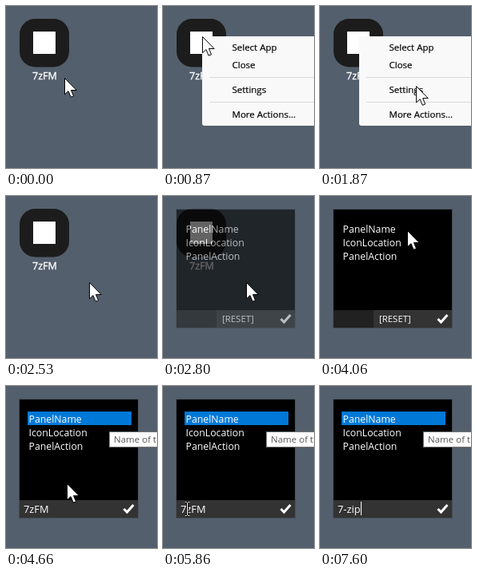
An HTML page that plays this animation: 189x203 px, repeating every 8 s.

```html
<!DOCTYPE html>
<html lang="en">
<head>
<meta charset="utf-8">
<title>Panel settings</title>
<style>
html, body { margin: 0; width: 100%; height: 100%; overflow: hidden; background: #535f6c; }
svg { display: block; width: 189px; height: 203px; font-family: "Open Sans", "Noto Sans", sans-serif; }
[data-on] { visibility: hidden; }
.label { font-size: 12.6px; fill: #fff; stroke: #fff; stroke-width: .35px; }
.menu text { font-size: 11.5px; fill: #000; stroke: #000; stroke-width: .2px; }
.row { font-size: 12.3px; fill: #fff; }
.value { font-size: 12.8px; fill: #fff; }
</style>
</head>
<body>
<svg viewBox="0 0 189 203">
  <rect width="189" height="203" fill="#535f6c"/>

  <rect x="17" y="16" width="62" height="60.5" rx="19.5" fill="#1c1c1c"/>
  <rect x="34" y="32" width="28" height="28" fill="#fff"/>
  <text class="label" x="33" y="92">7zFM</text>

  <g class="menu" data-on="870 2530">
    <rect x="49" y="38" width="150" height="112" rx="3" fill="#f9f9f9"/>
    <path d="M58 89.5H189M58 120.5H189" stroke="#d9d9d9"/>
    <text x="86.5" y="56">Select App</text>
    <text x="86.5" y="78">Close</text>
    <text x="86.5" y="109">Settings</text>
    <text x="86.5" y="140">More Actions...</text>
  </g>

  <g id="panel" opacity="0">
    <rect x="16.5" y="16.5" width="149" height="149" stroke="#454d56"/>
    <rect x="17" y="143" width="148" height="22" fill="#333"/>
    <rect x="27" y="32" width="130" height="17" fill="#0078d7" data-on="4200"/>
    <g class="row">
      <text x="28.5" y="46">PanelName</text>
      <text x="28.5" y="63">IconLocation</text>
      <text x="28.5" y="80">PanelAction</text>
    </g>
    <g data-on="2600 4400">
      <rect x="17" y="143" width="50" height="22" fill="#212121"/>
      <text x="74" y="158" font-size="11.4" fill="#fff">[RESET]</text>
    </g>
    <rect id="mark" x="29" y="145" height="17" fill="#0078d7" data-on="5930 6930"/>
    <text id="value" class="value" x="22" y="158.5" data-on="4400">7zFM</text>
    <path id="caret" d="M.5 145V162" stroke="#fff" data-on="6060"/>
    <path d="M147.5 154L151.5 158L159.5 149" fill="none" stroke="#fff" stroke-width="3"/>
  </g>

  <g data-on="4400">
    <rect x="129.5" y="57.5" width="110" height="19" fill="#fff" stroke="#767676"/>
    <text x="135" y="71" font-size="11.5" fill="#575757">Name of the panel</text>
  </g>

  <path id="arrow" d="M.5 .5V20.8L5 16.6L8.2 24.2L11.6 22.8L8.5 15.5H15.2Z" fill="#fff" stroke="#000" data-on="0 4860"/>
  <g id="beam" fill="none" data-on="4860 6930">
    <path id="bar" d="M-3 -8.5H-1L0 -7.5L1 -8.5H3M0 -7.5V7.5M-3 8.5H-1L0 7.5L1 8.5H3" stroke="#000" stroke-width="2"/>
    <use href="#bar" style="stroke: #fff"/>
    <path d="M-3 -8.5H-1L0 -7.5L1 -8.5H3M0 -7.5V7.5M-3 8.5H-1L0 7.5L1 8.5H3" stroke="#fff"/>
  </g>
</svg>
<script>
const LOOP = 8000, STEP = 200 / 3;
const DRAG_END = 6070, TYPE_START = 6930, KEY_GAP = 200, BLINK = 530;
const $ = id => document.getElementById(id);
const ramp = (t, from, to) => Math.min(1, Math.max(0, (t - from) / (to - from)));

const timed = [...document.querySelectorAll('[data-on]')].map(el => {
  const [from, to = Infinity] = el.dataset.on.split(' ').map(Number);
  return { el, from, to };
});

// Each move leads from the last place to x, y
const moves = [
  { from: 0, to: 600, x: 42, y: 38 },
  { from: 800, to: 867, x: 49, y: 38 },
  { from: 1267, to: 1933, x: 128, y: 107 },
  { from: 1933, to: 2133, x: 112, y: 106 },
  { from: 2467, to: 2533, x: 104, y: 108 },
  { from: 3467, to: 4067, x: 109, y: 43 },
  { from: 4333, to: 4667, x: 76, y: 122 },
  { from: 4667, to: 4867, x: 37, y: 159 },
  { from: 4867, to: 5867, x: 30.5, y: 154 },
  { from: 5867, to: 6067, x: 88.5, y: 154 }
];

function pointer(t) {
  let x = 73, y = 90;
  for (const m of moves) {
    const k = ramp(t, m.from, m.to);
    x += (m.x - x) * k;
    y += (m.y - y) * k;
  }
  return [x, y];
}

function drawField(t) {
  const keys = Math.floor((t - TYPE_START) / KEY_GAP);
  const typing = keys >= 0;
  $('value').textContent = typing ? '7-zip'.slice(0, 2 + keys) : '7zFM';
  const x = Math.round(22 + $('value').getComputedTextLength());
  const last = typing ? TYPE_START + Math.min(keys, 3) * KEY_GAP : DRAG_END;
  const lit = (t - last) % (2 * BLINK) < BLINK;
  $('caret').setAttribute('transform', `translate(${x} 0)`);
  $('caret').setAttribute('opacity', lit ? 1 : 0);
}

function draw(now) {
  // The screen refreshes 15 times a second
  const tick = Math.floor((now % LOOP + 7) / STEP) * STEP % LOOP;
  const t = tick + 5;
  for (const { el, from, to } of timed)
    el.style.visibility = t >= from && t < to ? 'visible' : 'hidden';

  const [x, y] = pointer(tick);
  for (const id of ['arrow', 'beam'])
    $(id).setAttribute('transform', `translate(${x} ${y})`);
  $('mark').setAttribute('width', Math.min(24, Math.max(0, x - 29)));
  $('panel').setAttribute('opacity', ramp(tick, 2600, 2930));
  drawField(t);
}

const start = performance.now();
function loop() {
  draw(performance.now() - start);
  requestAnimationFrame(loop);
}
loop();
</script>
</body>
</html>
```
